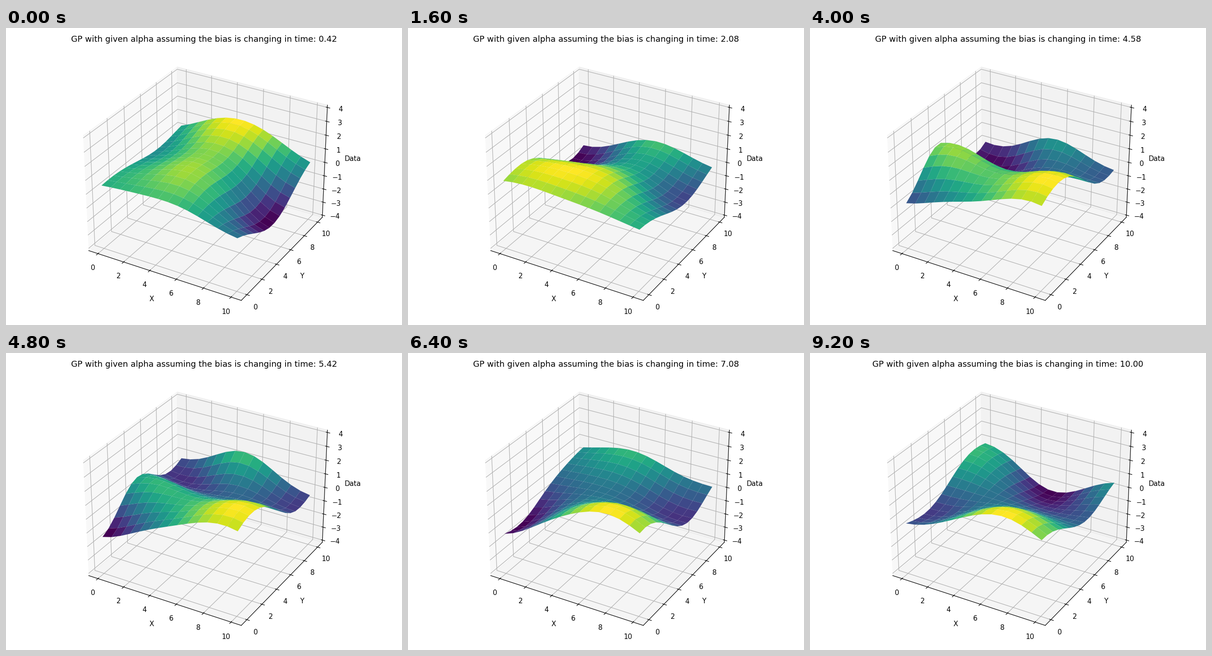
A matplotlib script for the animation above (9600 ms loop, 864 by 648 pixels).

```python
import numpy as np
import matplotlib.pyplot as plt
from matplotlib.animation import FuncAnimation

WIDTH, HEIGHT, DPI = 864, 648, 108
FRAMES, INTERVAL = 24, 400
SCALES = np.array([2.6, 2.6, 1.5])  # correlation lengths in x, y and time

# Time step: the main hills and hollows (x, y, height) at that moment.
HILLS = {
    1: [(2.5, 9.5, 1.4), (6.5, 10, 1.6), (6, 3.4, 1.1), (9.5, 4.2, -1.7)],
    5: [(0.8, 0.5, 1.05), (6.4, 3.4, 1), (0.5, 8.5, -1.6), (9.5, 7, -0.9)],
    11: [(0, 0, -0.8), (1.4, 4.2, 1.85), (2.8, 8, -1.6), (9.5, 1, 2.4),
         (9.6, 4.8, 1.6)],
    13: [(0, 0, -1.45), (7, 0.9, 1.85), (4, 10, 1.3), (9.5, 7.5, -0.5)],
    17: [(0.2, 2.5, -1.3), (8.5, 0.8, 2.4), (9.5, 5.5, -0.5)],
    21: [(7.5, 0.5, 3.3), (1.3, 8.8, 0.9), (9, 6.8, -0.7), (10, 10, 0.85),
         (2.5, 0.5, 1)],
    24: [(1, 8.5, 0.9), (5, 10, -1.4), (1.5, 1.5, -0.5)],
}

plt.rcParams["font.family"] = "DejaVu Sans"


def kernel(a, b):
    """Squared-exponential covariance between points in space and time."""
    gap = (a[:, None, :] - b[None, :, :]) / SCALES
    return np.exp(-0.5 * (gap ** 2).sum(axis=-1))


def seconds(step):
    return step * 10 / FRAMES


axis = np.linspace(0, 10, 15)
X, Y = np.meshgrid(axis, axis)

known = np.array([(x, y, seconds(step))
                  for step, hills in HILLS.items() for x, y, _ in hills])
heights = np.array([z for hills in HILLS.values() for *_, z in hills])
gains = np.linalg.solve(kernel(known, known) + 0.01 * np.eye(len(known)),
                        heights)


def surface(t):
    """Gaussian-process mean over the mesh at time t."""
    query = np.column_stack([X.ravel(), Y.ravel(), np.full(X.size, t)])
    return (kernel(query, known) @ gains).reshape(X.shape)


def padded(low, high):
    margin = (high - low) / 48
    return low - margin, high + margin


fig = plt.figure(figsize=(WIDTH / DPI, HEIGHT / DPI), dpi=DPI)
pad, top = 16.2, 39.2
ax = fig.add_axes([pad / WIDTH, pad / HEIGHT,
                   1 - 2 * pad / WIDTH, 1 - (pad + top) / HEIGHT],
                  projection="3d")
ax.set(xlim=padded(-0.5, 10.5), ylim=padded(-0.5, 10.5), zlim=padded(-4, 4),
       xticks=range(0, 11, 2), yticks=range(0, 11, 2), zticks=range(-4, 5),
       xlabel="X", ylabel="Y", zlabel="Data")
title = ax.set_title("", y=1.0)
title.set_y(1.0)  # 3D axes lower the title by default
sheet = None


def draw(i):
    global sheet
    if sheet is not None:
        sheet.remove()
    t = seconds(i + 1)
    sheet = ax.plot_surface(X, Y, surface(t), cmap="viridis")
    title.set_text("GP with given alpha assuming the bias is "
                   f"changing in time: {t:.2f}")
    return sheet, title


anim = FuncAnimation(fig, draw, frames=FRAMES, interval=INTERVAL,
                     repeat=True, repeat_delay=0, blit=False)
plt.show()
```
